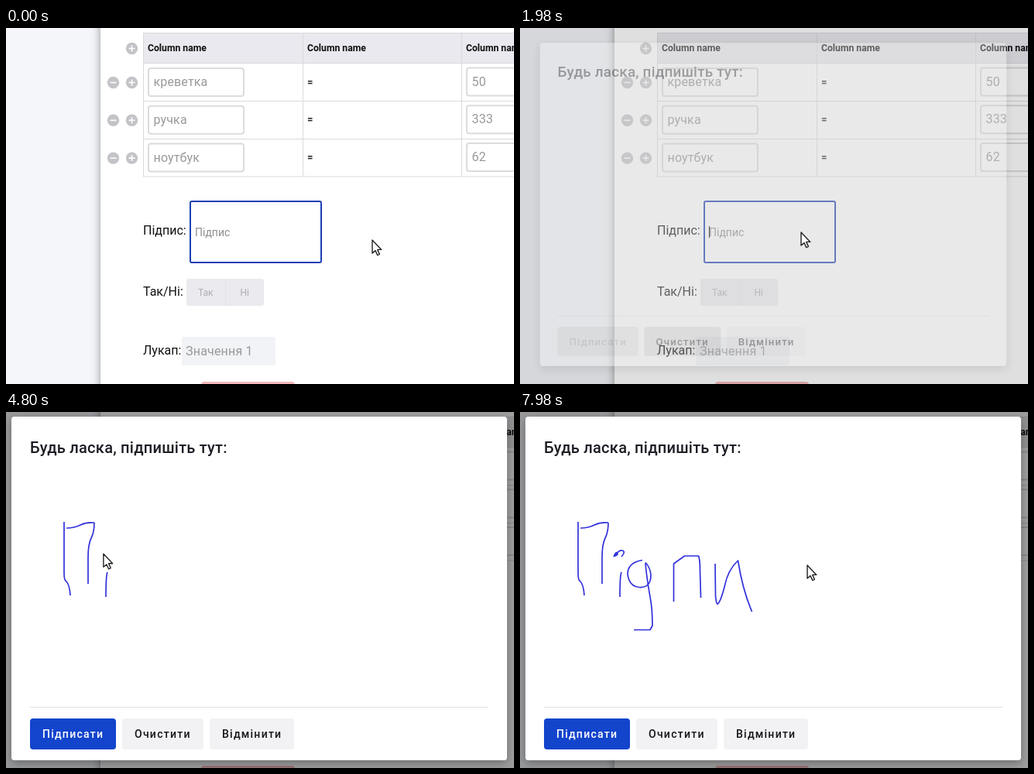
An HTML page that plays this animation: 656x460 px, repeating every 8000 ms.

```html
<!DOCTYPE html>
<html lang="uk">
<head>
<meta charset="utf-8">
<title>Підпис</title>
<style>
html, body { margin: 0; width: 100%; height: 100%; overflow: hidden; background: #f4f6fa; }
svg { display: block; font-family: Roboto, sans-serif; }
#ink { fill: none; stroke: #3232dc; stroke-width: 1.7; stroke-linejoin: round; }
</style>
</head>
<body>
<svg id="stage" width="656" height="460" viewBox="0 0 656 460"></svg>
<script>
const LOOP = 8000, STEP = 60, PEN_LAG = 60;

const rect = (x, y, w, h, fill, r = 0, extra = '') =>
  `<rect x="${x}" y="${y}" width="${w}" height="${h}" rx="${r}" fill="${fill}" ${extra}/>`;
const text = (x, y, size, fill, str, weight = 400, spacing = 0, extra = '') =>
  `<text x="${x}" y="${y}" font-size="${size}" fill="${fill}" font-weight="${weight}" letter-spacing="${spacing}" ${extra}>${str}</text>`;
const line = (d, color, width = 1) =>
  `<path d="${d}" fill="none" stroke="${color}" stroke-width="${width}"/>`;
const icon = (x, y, plus) =>
  `<circle cx="${x}" cy="${y}" r="7.7" fill="#c3c3c8"/>` +
  line(`M${x - 4} ${y}h8` + (plus ? `M${x} ${y - 4}v8` : ''), '#fff', 1.6);
const input = (x, y, w, str) =>
  rect(x, y, w, 36, '#fff', 3, 'stroke="#dcdcdf" stroke-width="2"') +
  text(x + 6.5, y + 23, 16, '#999', str, 400, .15);

function page() {
  const rows = [['креветка', 50], ['ручка', 333], ['ноутбук', 62]];
  const columns = [177.5, 383.5, 588.5];
  return rect(0, 0, 656, 460, '#f4f6fa') +
    rect(122, -30, 600, 520, '#fff', 0, 'filter="url(#pageShadow)"') +
    rect(177, 6, 500, 39, '#e9e9ef') +
    columns.map(x => line(`M${x} 6V192`, '#dadadd') + text(x + 5.5, 30, 12.2, '#111', 'Column name', 700)).join('') +
    [6.5, 45.5, 94.5, 143.5, 192].map(y => line(`M177 ${y}H656`, '#dadadd')).join('') +
    icon(162.5, 26.5, true) +
    rows.map(([name, count], i) => {
      const y = 52 + i * 48.8;
      return icon(138.5, y + 18.5) + icon(162.5, y + 18.5, true) +
        input(184, y, 123, name) + input(595, y - .5, 90, count) +
        text(389, y + 21.5, 13, '#222', '=', 700);
    }).join('') +
    text(177, 267, 16, '#111', 'Підпис:') +
    rect(238, 224, 169, 79, '#fff', 2, 'stroke="#1d3fb5" stroke-width="2"') +
    text(244, 268.5, 14, '#8e8e8e', 'Підпис') +
    text(177, 346, 16, '#111', 'Так/Ні:') +
    rect(233, 324, 100, 35, '#ebebef', 3) + line('M283.5 324v35', '#e2e2e6') +
    text(248, 346, 12, '#adadb1', 'Так') + text(302.5, 346, 12, '#adadb1', 'Ні') +
    text(177, 422, 16, '#111', 'Лукап:') +
    rect(227, 399, 121, 37, '#f2f3f6', 2) +
    text(232, 423, 16, '#999', 'Значення 1', 400, .2) +
    rect(252, 457, 121, 30, '#f5b9bd', 4);
}

const button = (id, x, w, str) =>
  rect(x, 396, w, 40, '#f2f2f5', 4, `id="${id}"`) +
  text(x + 16, 421, 14, '#151519', str, 500, 1.25, `id="${id}Label"`);

const dialog = () =>
  rect(7, 6, 640, 444, '#fff', 4, 'filter="url(#dialogShadow)"') +
  text(31, 53, 20, '#1c1c24', 'Будь ласка, підпишіть тут:', 500, .25) +
  line('M31 381.5H623', '#e0e0e0') +
  button('sign', 31, 111, 'Підписати') +
  button('clear', 150, 105, 'Очистити') +
  button('cancel', 263, 109, 'Відмінити') +
  '<g id="ink"></g>';

const stage = document.getElementById('stage');
stage.innerHTML = `
<defs>
  <filter id="pageShadow" x="-10%" y="-10%" width="120%" height="120%">
    <feDropShadow dx="0" dy="0" stdDeviation="6" flood-opacity=".4"/>
  </filter>
  <filter id="dialogShadow" x="-10%" y="-10%" width="120%" height="120%">
    <feDropShadow dx="0" dy="4" stdDeviation="6" flood-opacity=".3"/>
  </filter>
</defs>
${page()}
<g id="caret">${line('M244.5 256v15', '#111', 1.2)}</g>
<g id="tooltip">${rect(276, 318, 93, 23, '#616161', 4, 'fill-opacity=".95"')}${text(283, 333, 10, '#fff', 'Поставте підпис', 500)}</g>
<rect id="backdrop" width="656" height="460"/>
<g id="dialog">${dialog()}</g>
<path id="arrow" d="M0 0V17L4 13.6 6.8 19.6 9.4 18.4 6.7 12.4H11.8Z" fill="#fff" stroke="#222" stroke-width="1.4" stroke-linejoin="round"/>
<g id="beam">${line('M-4 -8H4M-4 8H4M0 -8V8', '#fff', 4)}${line('M-3.5 -7.5H3.5M-3.5 7.5H3.5M0 -7.5V7.5', '#111', 1.8)}</g>`;
const $ = id => document.getElementById(id);

// Pointer travel in order of time; between segments it glides straight on.
const segments = [];
function travel(start, end, d) {
  const path = document.createElementNS(stage.namespaceURI, 'path');
  path.setAttribute('d', d);
  const segment = { start, end, path, length: path.getTotalLength() };
  segments.push(segment);
  return segment;
}
function stroke(start, end, d) {
  const segment = travel(start, end, d);
  segment.pen = true;
  $('ink').append(segment.path);
}

travel(60, 900, 'M473 274L363 264');
travel(2040, 2640, 'M363 264L74 140');
// П
stroke(2760, 3180, 'M75 142v66q0 10 3 11 4 4 5 18');
stroke(3360, 3600, 'M78 150q10 0 18-4t18-3');
stroke(3600, 3720, 'M114 143q0 12-4 20t-4 25');
stroke(3720, 3900, 'M106 188v34');
// і
stroke(4140, 4320, 'M131 207q-2 4-2 32');
stroke(4740, 4980, 'M121 187q4-9 5-3l-3 2q4-8 9-7t-1 8');
// д
stroke(5400, 5640, 'M158 191.5q-19 3-19 18 2 16 15 17 15 1 15-16-1-10-7-16');
stroke(5640, 5760, 'M162 195q1 15 6 44');
stroke(5760, 5940, 'M168 239q3 15 3 37l-3 5.5h-21');
// п
stroke(6300, 6780, 'M198.5 245v-49l14-10h18q2 4 2 20l1 34');
travel(6780, 6960, 'M233 240L252 204');
// и
stroke(7080, 7560, 'M252 196l.5 42q1 11 3 10 4-4 9-24 4-20 17-32 6 38 18 66');
travel(7620, 7800, 'M300 258Q400 214 450 208');
travel(7800, 7980, 'M450 208L371 198');

const clamp = v => Math.max(0, Math.min(1, v));
const ramp = (t, from, to) => clamp((t - from) / (to - from));
const pointOn = (s, k) => s.path.getPointAtLength(s.length * k);

function pointer(t) {
  const i = segments.findIndex(s => t < s.end);
  if (i < 0) return pointOn(segments[segments.length - 1], 1);
  const next = segments[i], last = segments[i - 1];
  if (t >= next.start || !last) return pointOn(next, ramp(t, next.start, next.end));
  const a = pointOn(last, 1), b = pointOn(next, 0), k = ramp(t, last.end, next.start);
  return { x: a.x + (b.x - a.x) * k, y: a.y + (b.y - a.y) * k };
}

function drawInk(t) {
  for (const { pen, path, length, start, end } of segments) {
    if (!pen) continue;
    const k = ramp(t, start, end);
    path.setAttribute('visibility', k > 0 ? 'visible' : 'hidden');
    path.setAttribute('stroke-dasharray', k < 1 ? `${length * k} ${length + 1}` : 'none');
  }
}

function draw(t) {
  const { x, y } = pointer(t);
  const open = ramp(t, 1920, 2100);
  const eased = 1 - (1 - open) ** 3;
  const typing = open === 0 && x < 407;
  const signed = t >= 3240;

  $('caret').setAttribute('opacity', +(t >= 1860));
  $('tooltip').setAttribute('opacity', ramp(t, 900, 1020) * (1 - ramp(t, 1860, 1980)));
  $('backdrop').setAttribute('opacity', open * .38);
  $('dialog').setAttribute('display', open ? 'inline' : 'none');
  $('dialog').setAttribute('opacity', open);
  $('dialog').setAttribute('transform', `translate(327 228) scale(${.8 + .2 * eased}) translate(-327 -228)`);
  $('sign').setAttribute('fill', signed ? '#1344cc' : '#e2e3e3');
  $('signLabel').setAttribute('fill', signed ? '#fff' : '#a8a9a9');
  $('clear').setAttribute('fill', t < 2820 ? '#d7d7da' : '#f2f2f5');
  drawInk(t - PEN_LAG);
  for (const [id, shown] of [['arrow', !typing], ['beam', typing]]) {
    $(id).setAttribute('transform', `translate(${x} ${y})`);
    $(id).setAttribute('opacity', +shown);
  }
}

const begin = performance.now();
function frame() {
  const t = (performance.now() - begin) % LOOP;
  draw(Math.floor(t / STEP) * STEP);
  requestAnimationFrame(frame);
}
frame();
</script>
</body>
</html>
```
